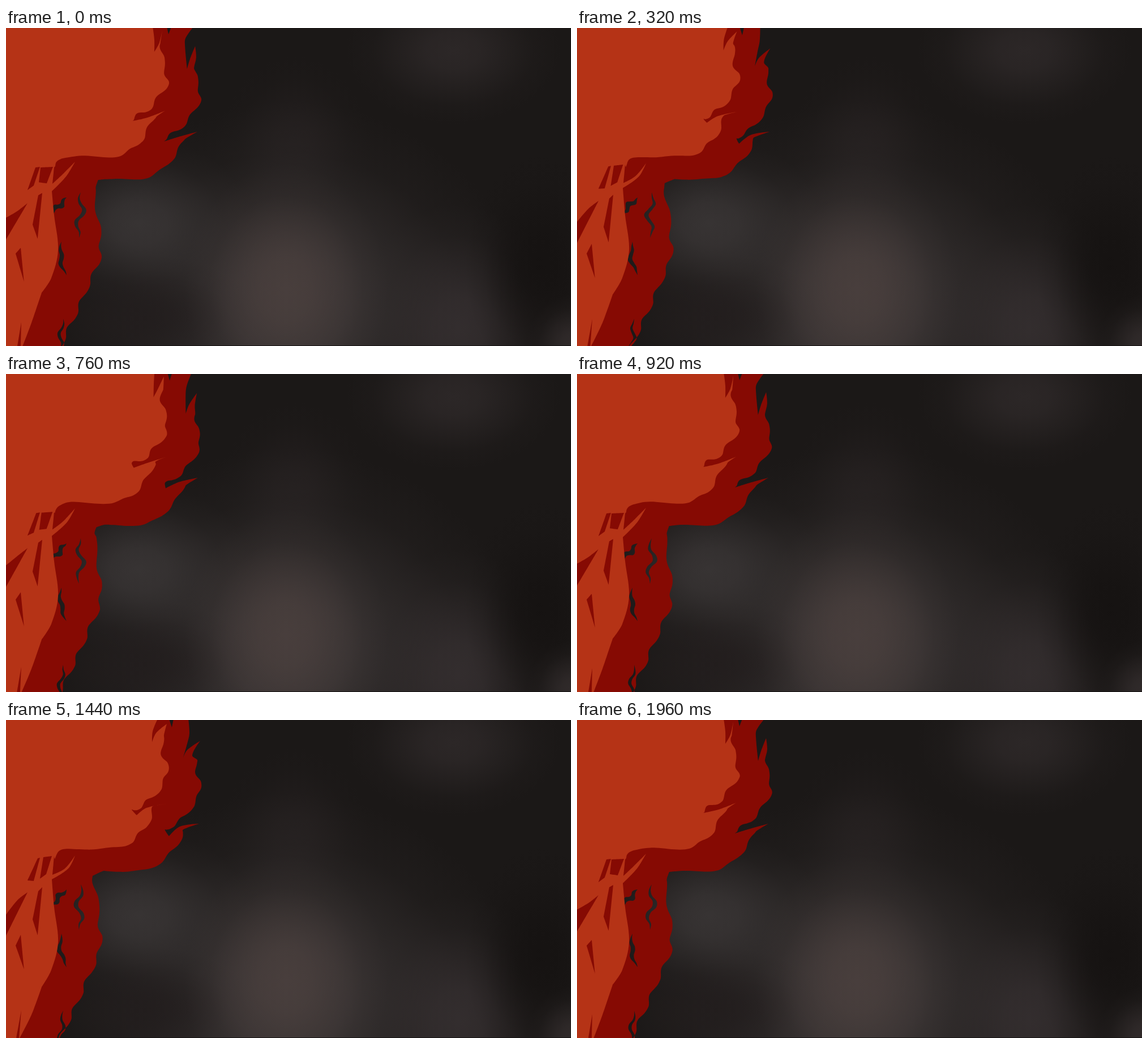
Animation of 998x561 px, one loop 2 s. Source, as an HTML page:

```html
<!DOCTYPE html>
<html lang="en">
<head>
<meta charset="utf-8">
<title>Rising flames</title>
<style>
  html, body { margin: 0; width: 100%; height: 100%; overflow: hidden; background: #1b1817; }
  svg { display: block; width: 100vw; height: 100vh; }
</style>
</head>
<body>
<svg viewBox="0 0 998 561" preserveAspectRatio="none">
  <defs id="defs"></defs>
  <rect width="998" height="561" fill="#1b1817"/>
  <g id="haze"></g>
  <rect y="560" width="998" height="1" fill="#161313"/>
  <path id="ember" fill="#860a03" fill-rule="evenodd"/>
  <path id="blaze" fill="#b53316" fill-rule="evenodd"/>
</svg>
<script>
const CYCLE = 1000, STEP = 40, TAU = 2 * Math.PI;
const $ = id => document.getElementById(id);
let phase = 0, sway = 0;

function spot(x, y, rx, ry, color, alpha = 1) {
  const id = 'spot' + $('haze').childElementCount;
  const stops = [0, .25, .5, .75, 1].map(o =>
    `<stop offset="${o}" stop-color="${color}" stop-opacity="${alpha * Math.cos(o * TAU / 4) ** 2}"/>`);
  $('defs').innerHTML += `<radialGradient id="${id}">${stops.join('')}</radialGradient>`;
  $('haze').innerHTML += `<ellipse cx="${x}" cy="${y}" rx="${rx}" ry="${ry}" fill="url(#${id})"/>`;
}
spot(790, 40, 190, 130, '#2c2727');
spot(510, 200, 130, 150, '#252020', .8);
spot(500, 490, 410, 360, '#3a3535');
spot(235, 345, 200, 150, '#3a3636', .9);
spot(250, 510, 190, 110, '#221d1d', .85);
spot(495, 460, 180, 220, '#4b403e', .85);
spot(800, 530, 180, 220, '#352f30', .9);
spot(940, 420, 130, 200, '#151211', .9);
spot(1000, 560, 80, 90, '#332d2d', .9);

// Points are [x, y, smoothness]; dx, dy is how far they sway.
const bend = (x, y, dx = 0, dy = 0, smooth = 1) => [x + dx * sway, y + dy * sway, smooth];
const tip = (x, y, dx, dy) => bend(x, y, dx, dy, 0);

function along(knots, s) {
  const i = Math.min(Math.floor(s), knots.length - 2), u = s - i;
  const knot = k => knots[Math.max(0, Math.min(knots.length - 1, k))];
  return [0, 1].map(j => {
    const [a, b, c, d] = [-1, 0, 1, 2].map(k => knot(i + k)[j]);
    return b + u / 2 * (c - a + u * (2 * a - 5 * b + 4 * c - d + u * (3 * (b - c) + d - a)));
  });
}

// A flame edge: dents climb a fixed spine, one knot per cycle.
function edge(knots, from, depth, endDepth = depth) {
  const points = [], last = knots.length - 1, count = Math.ceil((last - from) * 10);
  for (let i = 0; i <= count; i++) {
    const s = from + (last - from) * i / count;
    const [x, y] = along(knots, s);
    const [ax, ay] = along(knots, Math.max(0, s - .05));
    const [bx, by] = along(knots, Math.min(last, s + .05));
    const wave = (s + phase) % 1;
    const dent = Math.sin(Math.PI * wave ** 1.4) ** 2 * (depth + (endDepth - depth) * s / last);
    const k = dent / Math.hypot(bx - ax, by - ay);
    points.push([x - (by - ay) * k, y + (bx - ax) * k, 1]);
  }
  return points;
}

// A thin gap between two ends, with a ripple running up it.
function sliver(x1, y1, x2, y2, bow, width, ripple) {
  const dx = x2 - x1, dy = y2 - y1, length = Math.hypot(dx, dy), n = 8;
  const side = (u, sign) => {
    const swell = Math.sin(Math.PI * u);
    const off = swell * (bow + sign * width - ripple * Math.cos(TAU * ((u - .7) / .6 + phase)));
    return [x1 + dx * u + dy / length * off, y1 + dy * u - dx / length * off, swell > .01 ? 1 : 0];
  };
  return Array.from({ length: 2 * n }, (_, i) => i <= n ? side(i / n, 1) : side(2 - i / n, -1));
}

const ember = () => [
  [
    tip(284, -2, 4), tip(287, 11, 6, 2), tip(292, -2, 4),
    tip(331, -2, -9), bend(317, 18, 7, 6), bend(316, 30, 4, 12), tip(320, 72, -7, -6),
    bend(325, 55, -5, -2), tip(334, 32, 9, 5), bend(336, 52, -7, 10),
    ...edge([[337, 46], [339, 86], [345, 128], [317, 172], [283, 197]], .65, 6),
    tip(279, 200, 9, 5), bend(305, 192, 2, -4), tip(338, 183, 3),
    ...edge([[322, 188], [297, 231], [250, 265], [172, 267]], .25, 7, 1),
    tip(163, 268, -10, 7),
    ...edge([[158, 276], [168, 352], [169, 405], [148, 456], [127, 504], [105, 550], [82, 600]], .1, 7),
    tip(-5, 600), tip(-5, -5)
  ],
  sliver(107, 299, 80, 328, 0, 5, 4),
  sliver(132, 290, 129, 370, 0, 4, 8),
  sliver(98, 377, 107, 436, -6, 4, 3),
  sliver(101, 513, 94, 580, 0, 3, -5)
];

const blaze = () => [
  [
    tip(259, -2, 9), bend(262, 20, -3), tip(262, 42, -4, -3), bend(271, 26, -6, -3), tip(276, 3, 8, 4),
    ...edge([[280, 8], [280, 52], [288, 98], [258, 142], [225, 163]], .5, 8),
    tip(223, 164, 8, 4), bend(250, 158, -2, -3), tip(281, 146, 3, 2),
    ...edge([[268, 153], [243, 198], [199, 227], [105, 229], [86, 245]], .1, 9, 0),
    tip(85, 246, 0, -6), tip(82, 275, 0, -2), bend(100, 258, 4, 4), tip(122, 236, 0, 3),
    bend(106, 262, 4), tip(81, 288, 0, -7),
    bend(85, 330), bend(92, 392), bend(80, 441), tip(63, 467, 0, 4), bend(45, 520), tip(28, 565, -6),
    tip(-5, 565), tip(-5, -5)
  ],
  [tip(52, 246, 4, -2), tip(60, 245, 0, -2), tip(49, 278, 0, 6), tip(38, 286, 0, -3)],
  [tip(61, 246, 5, -4), tip(83, 245, -2, -5), tip(72, 274, -1, -2), tip(58, 272, 2, 8)],
  [tip(57, 295, 0, 7), tip(64, 291, 0, 4), tip(56, 372, 0, 8), tip(47, 347, 0, 5)],
  [tip(38, 309, 0, -5), bend(20, 323, 0, -5), tip(-1, 335, 0, 10), tip(-1, 375, 0, 8)],
  [tip(17, 398), tip(26, 388, 0, -9), tip(32, 448, 0, -8)],
  [tip(27, 519, 0, -7), tip(20, 562, -2), tip(26, 562, -3)]
];

function outline(points) {
  const n = points.length, at = i => points[(i + n) % n];
  const fmt = (x, y) => x.toFixed(2) + ' ' + y.toFixed(2);
  const handle = (i, length) => {
    const [x, y, smooth] = at(i), p = at(i - 1), q = at(i + 1);
    const dx = q[0] - p[0], dy = q[1] - p[1];
    const k = smooth * length / 3 / (Math.hypot(dx, dy) || 1);
    return fmt(x + dx * k, y + dy * k);
  };
  let d = 'M' + fmt(...points[0]);
  for (let i = 0; i < n; i++) {
    const p = at(i), q = at(i + 1), length = Math.hypot(q[0] - p[0], q[1] - p[1]);
    d += `C${handle(i, length)} ${handle(i + 1, -length)} ${fmt(q[0], q[1])}`;
  }
  return d + 'Z';
}

const draw = (id, shapes) => $(id).setAttribute('d', shapes.map(outline).join(''));

function render(time) {
  phase = Math.floor(time / STEP) * STEP % CYCLE / CYCLE;
  sway = (1 - Math.cos(TAU * (phase + .04))) / 2;
  draw('ember', ember());
  draw('blaze', blaze());
}

const start = performance.now();
function tick() {
  render(performance.now() - start);
  requestAnimationFrame(tick);
}
tick();
</script>
</body>
</html>
```
